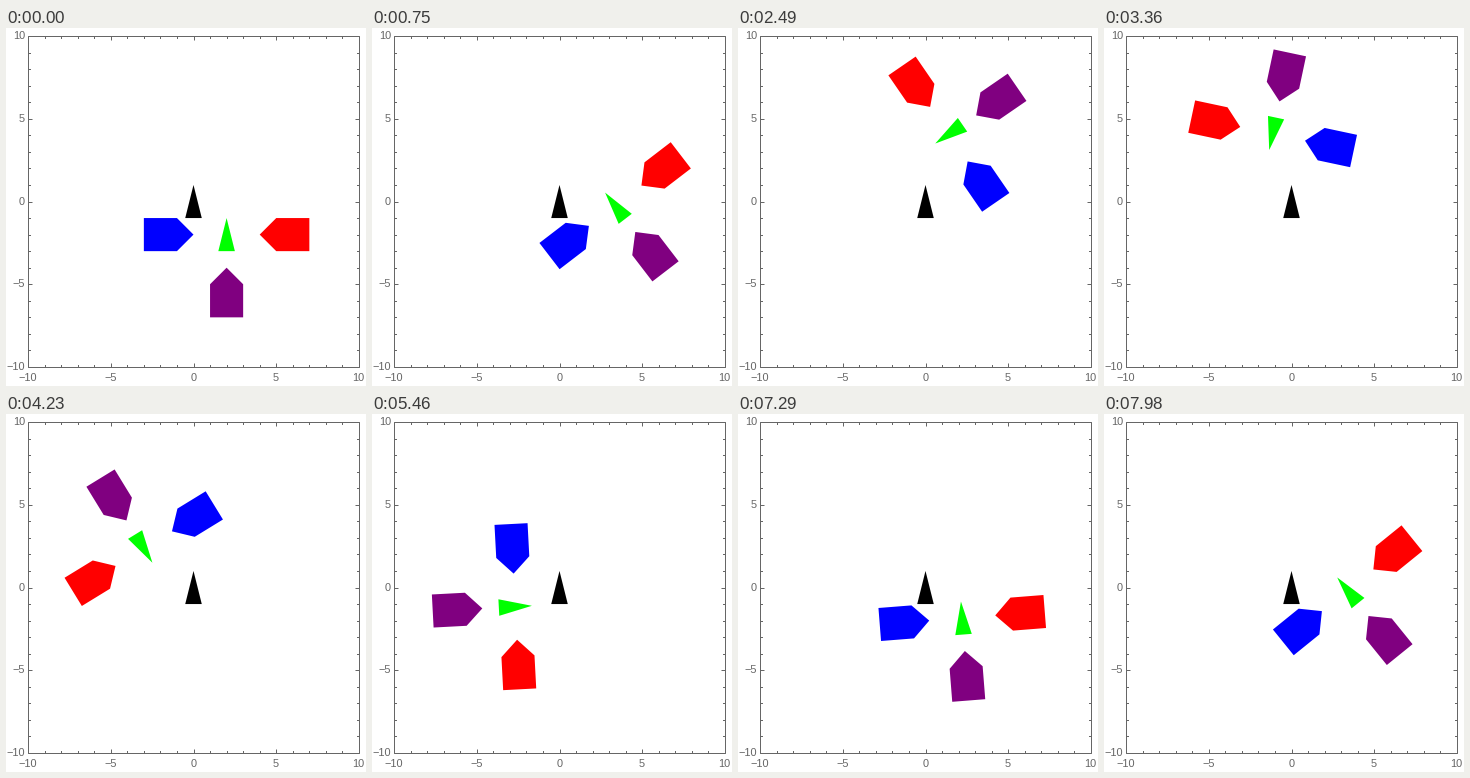
Animation of 360 by 358 pixels, one loop 8000 ms. Source, as a matplotlib script:

```python
import numpy as np
import matplotlib.pyplot as plt
from matplotlib.animation import FuncAnimation
from matplotlib.collections import LineCollection
from matplotlib.patches import Polygon

W, H, DPI = 360, 358, 72
LOOP, TICK = 8000, 10            # ms
STEP, DEG_PER_MS = 30, 0.05      # pose is held for STEP ms
LEFT, TOP, SIDE = 22.5, 8.5, 331
UNIT = SIDE / 20
ORIGIN = np.array([187.5, 173.5])
GRAY = "#666666"
PIVOT = np.array([0.11, 0.88])

fig = plt.figure(figsize=(W / DPI, H / DPI), dpi=DPI, facecolor="white")
ax = fig.add_axes([0, 0, 1, 1])
ax.set_xlim(0, W)
ax.set_ylim(H, 0)
ax.axis("off")


def to_px(points):
    return ORIGIN + points * np.array([UNIT, -UNIT])


def turned(points, deg):
    a = np.radians(deg)
    c, s = np.cos(a), np.sin(a)
    return points @ np.array([[c, s], [-s, c]])


def dart(x, y):
    return np.array([(x, y + 1), (x - 0.5, y - 1), (x + 0.5, y - 1)])


def house(x, y, deg):
    """Pentagon with its tip at (x, y), pointing along deg."""
    shape = np.array([(0, 0), (-1, 1), (-3, 1), (-3, -1), (-1, -1)])
    return turned(shape, deg) + (x, y)


def draw_frame():
    right, bottom = LEFT + SIDE, TOP + SIDE
    lines = [[(LEFT, TOP), (right, TOP)], [(LEFT, bottom), (right, bottom)],
             [(LEFT, TOP), (LEFT, bottom)], [(right, TOP), (right, bottom)]]
    font = dict(family="Liberation Sans", fontsize=11, color=GRAY, va="baseline")
    for v in range(-10, 11):
        size = 4 if v % 5 == 0 else 2.5
        x = np.floor(LEFT + (v + 10) * UNIT) + 0.5
        y = np.floor(TOP + (10 - v) * UNIT) + 0.5
        lines += [[(x, bottom), (x, bottom - size)], [(x, TOP), (x, TOP + size)],
                  [(LEFT, y), (LEFT + size, y)], [(right, y), (right - size, y)]]
        if v % 5 == 0:
            label = str(v).replace("-", "\u2212")
            ax.text(x - 1, 353, label, ha="center", **font)
            ax.text(19, y + 2.5, label, ha="right", **font)
    grid = LineCollection(lines, colors=GRAY, linewidths=1)
    grid.set_snap(False)  # coordinates already sit on pixel centres
    ax.add_collection(grid)


def add_shape(points, color):
    patch = Polygon(to_px(points), closed=True, facecolor=color, linewidth=0)
    patch.set_snap(False)
    ax.add_patch(patch)
    return patch


draw_frame()
add_shape(dart(0, 0), "black")
movers = [(add_shape(points, color), points) for points, color in [
    (dart(2, -2), "#00ff00"),
    (house(0, -2, 0), "#0000ff"),
    (house(4, -2, 180), "#ff0000"),
    (house(2, -4, 90), "#800080"),
]]


def update(i):
    deg = i * TICK // STEP * STEP * DEG_PER_MS
    for patch, points in movers:
        patch.set_xy(to_px(turned(points - PIVOT, deg) + PIVOT))
    return [patch for patch, _ in movers]


anim = FuncAnimation(fig, update, frames=LOOP // TICK, interval=TICK,
                     init_func=lambda: update(0), repeat=True, repeat_delay=0)
plt.show()
```
